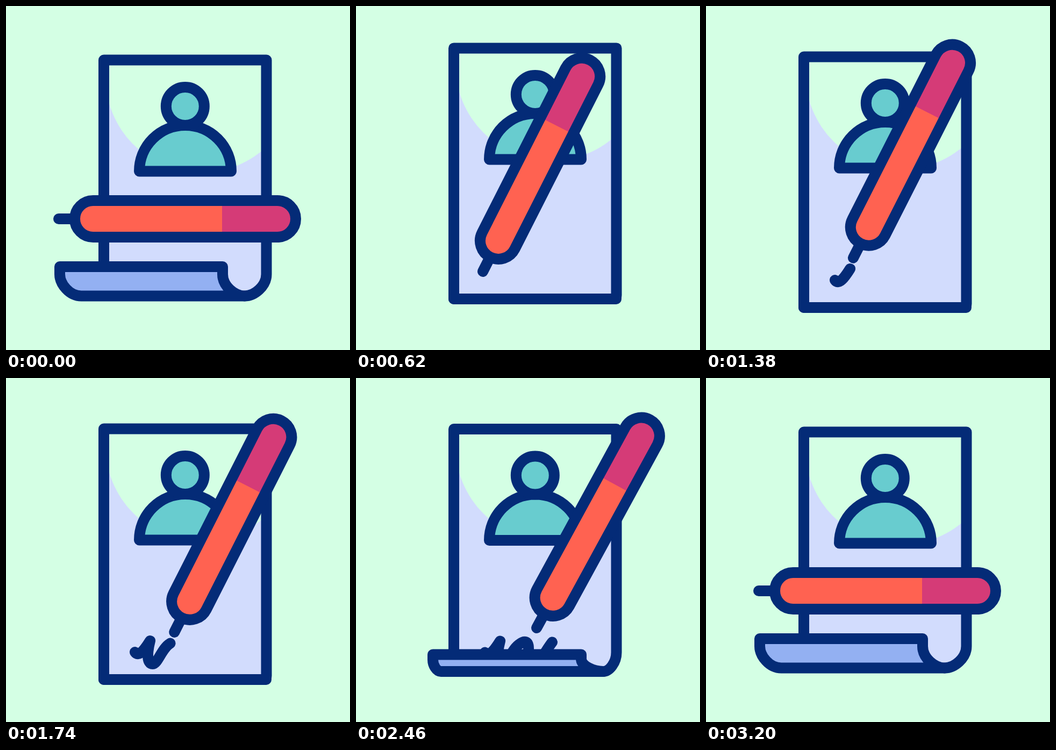
Write an HTML page that moves like this. It is 640 px wide and 640 px high and loops after 3.22 s.

```html
<!DOCTYPE html>
<html lang="en">
<head>
<meta charset="utf-8">
<title>Signing a profile sheet</title>
<style>
  html, body { margin: 0; height: 100%; overflow: hidden; background: #d4ffe4; }
  svg { display: block; width: 100vw; height: 100vh; }
  .line { stroke: #042b77; stroke-width: 20; stroke-linecap: round; stroke-linejoin: round; }
  .none { fill: none; }
  .mint { fill: #d4ffe4; }
  .page { fill: #d2dcfd; }
  .back { fill: #93b0f2; }
  .teal { fill: #68cccf; }
  .body { fill: #ff6251; }
  .cap { fill: #d53b77; }
  #rays line { stroke: #ffcb4f; stroke-width: 19.5; stroke-linecap: round; }
</style>
</head>
<body>
<svg viewBox="0 0 640 640">
  <defs>
    <clipPath id="sheetClip"><rect x="182" y="100" width="302" height="300"/></clipPath>
  </defs>
  <g id="scene">
    <path id="sheet" class="page"/>
    <circle class="mint" cx="363" cy="132" r="178" clip-path="url(#sheetClip)"/>
    <path id="edge" class="line none"/>
    <g class="line teal">
      <path d="M248 307.5A85.5 85.5 0 0 1 419 307.5Z"/>
      <circle cx="333.3" cy="186.5" r="35.5"/>
    </g>
    <g id="rays"></g>
    <path id="ink" class="line none" d="M240 516C247 526 258 511 268 495C262 518 262 538 273 538
      C282 538 290 509 305 500C313 494 321 494 321 509C321 526 322 539 332 538C342 536 352 514 365 497"/>
    <path id="roll" class="line back"/>
    <!-- the pen's tip is its local origin -->
    <g id="pen">
      <path class="line" d="M0 0H30"/>
      <rect class="body" x="30" y="-34" width="411" height="68" rx="34"/>
      <path class="cap" d="M304 -34H407A34 34 0 0 1 407 34H304Z"/>
      <rect class="line none" x="30" y="-34" width="411" height="68" rx="34"/>
    </g>
  </g>
</svg>
<script>
const LOOP = 3220;
const $ = id => document.getElementById(id);
const lerp = (a, b, k) => a + (b - a) * k;
const clamp = v => Math.max(0, Math.min(1, v));

// Smooth monotone curve through [time, value] keys, at rest at both ends.
function track(...keys) {
  const last = keys.length - 1;
  const rise = i => (keys[i + 1][1] - keys[i][1]) / (keys[i + 1][0] - keys[i][0]);
  const slope = keys.map((_, i) => {
    if (i === 0 || i === last) return 0;
    const a = rise(i - 1), b = rise(i);
    return a * b > 0 ? 2 * a * b / (a + b) : 0;
  });
  return t => {
    if (t <= keys[0][0]) return keys[0][1];
    if (t >= keys[last][0]) return keys[last][1];
    let i = 0;
    while (t > keys[i + 1][0]) i++;
    const [t0, v0] = keys[i], [t1, v1] = keys[i + 1];
    const w = t1 - t0, k = (t - t0) / w, m = 1 - k;
    return v0 * (1 + 2 * k) * m * m + v1 * k * k * (3 - 2 * k)
      + w * k * m * (slope[i] * m - slope[i + 1] * k);
  };
}

const lift = track([160, 0], [380, -54], [395, -55], [700, -13], [960, -6],
  [2400, -6], [2460, -5.5], [2720, -1.2], [2840, 0]);
const unroll = track([160, 0], [380, .79], [470, 1], [2160, 1], [2460, .43], [2700, .02], [2760, 0]);
const written = track([1100, 0], [1740, .55], [2200, 1]);
const tilt = track([160, 0], [380, 53.4], [450, 63.1], [2400, 63.1], [2460, 61.4],
  [2720, 18.9], [2880, 6.8], [3200, 0]);

const START = 1100, END = 2200;
const arriveX = track([160, 98], [380, 207], [470, 236]);
const arriveY = track([160, 396], [380, 506], [450, 516]);
const offX = track([START, -4], [1300, 5], [1740, 8], [END, 4]);
const offY = track([START, 0], [1250, -20], [1740, -21], [END, -21]);
const leaveX = track([END, 369], [2340, 369], [2460, 336], [2720, 158], [2880, 122], [3200, 98]);
const leaveY = track([END, 476], [2460, 470.5], [2720, 419], [2880, 404], [3200, 396]);

// Sheet poses by how far it is unrolled.
const poses = [
  { at: 0, sideY: 499, bendX: 444, low: 539.5, footX: 140, footY: 499, left: 100, top: 485, curl: 403, curlY: 499 },
  { at: .43, sideY: 516, bendX: 460, low: 551.5, footX: 158, footY: 530, left: 143, top: 520, curl: 419, curlY: 528 },
  { at: .79, sideY: 524, bendX: 471, low: 561, footX: 187, footY: 555, left: 182, top: 550, curl: 460, curlY: 551 },
  { at: 1, sideY: 560, bendX: 481, low: 567, footX: 185, footY: 567, left: 182, top: 567, curl: 484, curlY: 567 }
];

function poseAt(u) {
  let i = 0;
  while (i < poses.length - 2 && u > poses[i + 1].at) i++;
  const a = poses[i], b = poses[i + 1], k = (u - a.at) / (b.at - a.at);
  const p = {};
  for (const key in a) p[key] = lerp(a[key], b[key], k);
  return p;
}

// Quarter turns: from vertical to horizontal, and back.
const Q = .552;
const turnIn = (x1, y1, x2, y2) =>
  `C${x1} ${lerp(y1, y2, Q)} ${lerp(x2, x1, 1 - Q)} ${y2} ${x2} ${y2}`;
const turnOut = (x1, y1, x2, y2) =>
  `C${lerp(x1, x2, Q)} ${y1} ${x2} ${lerp(y2, y1, 1 - Q)} ${x2} ${y2}`;

function drawSheet(u) {
  const p = poseAt(u);
  const edge = `M182 ${p.top}V100.5H484.5V${p.sideY}` + turnIn(484.5, p.sideY, p.bendX, p.low);
  $('edge').setAttribute('d', edge);
  $('sheet').setAttribute('d', edge + turnOut(p.bendX, p.low, p.curl, p.curlY) + `V${p.top}Z`);
  $('roll').setAttribute('d', `M${p.left} ${p.top}H${p.curl}V${p.curlY}`
    + turnIn(p.curl, p.curlY, p.bendX, p.low) + `H${p.footX}`
    + turnOut(p.footX, p.low, p.left, p.footY) + 'Z');
}

const ink = $('ink');
const inkLength = ink.getTotalLength();

function drawInk(t) {
  const done = written(t) * inkLength;
  ink.style.display = t > START && t < 2720 ? '' : 'none';
  ink.setAttribute('stroke-dasharray', `${done} ${inkLength + 40}`);
  return ink.getPointAtLength(done);
}

function drawPen(t, head) {
  let x, y;
  if (t <= START) {
    x = arriveX(t);
    y = arriveY(t);
  } else if (t < END) {
    x = head.x + offX(t);
    y = head.y + offY(t);
  } else {
    x = leaveX(t);
    y = leaveY(t);
  }
  $('pen').setAttribute('transform', `translate(${x} ${y}) rotate(${-tilt(t)})`);
}

// Each ray runs from its inner to its outer end.
const rays = [
  [263, 153, 243, 139], [260, 210, 240, 219],
  [399, 150, 422, 143], [398, 210, 416, 217]
].map(ends => {
  const el = document.createElementNS('http://www.w3.org/2000/svg', 'line');
  $('rays').append(el);
  return { el, ends };
});

function drawRays(t) {
  const front = clamp((t - 2740) / 120), tail = clamp((t - 2900) / 120);
  $('rays').style.display = front > tail ? '' : 'none';
  for (const { el, ends: [x1, y1, x2, y2] } of rays) {
    el.setAttribute('x1', lerp(x1, x2, tail));
    el.setAttribute('y1', lerp(y1, y2, tail));
    el.setAttribute('x2', lerp(x1, x2, front));
    el.setAttribute('y2', lerp(y1, y2, front));
  }
}

function draw(t) {
  $('scene').setAttribute('transform', `translate(0 ${lift(t)})`);
  drawSheet(unroll(t));
  drawPen(t, drawInk(t));
  drawRays(t);
}

let begin;
function tick(now) {
  begin ??= now;
  draw((now - begin) % LOOP);
  requestAnimationFrame(tick);
}
draw(0);
requestAnimationFrame(tick);
</script>
</body>
</html>
```
